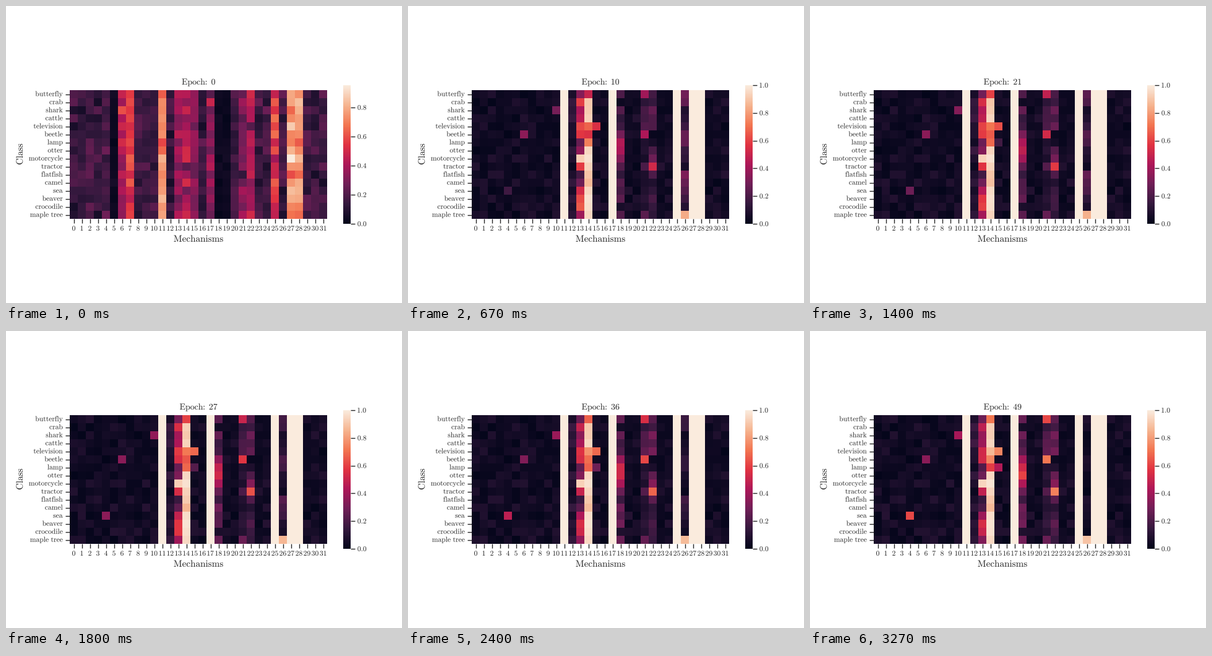
Recreate the animation shown at these times as a matplotlib script. Size 640 by 480 pixels, loop 3.34 s.

```python
import numpy as np
import matplotlib.pyplot as plt
from matplotlib.animation import FuncAnimation
from matplotlib.collections import LineCollection
from matplotlib.colors import LinearSegmentedColormap
from matplotlib.patches import PathPatch
from matplotlib.path import Path
from matplotlib.textpath import TextPath
from matplotlib.transforms import Affine2D

plt.rcParams["mathtext.fontset"] = "cm"

WIDTH, HEIGHT, DPI = 640, 480, 100
LOOP_MS, STEP_MS, EPOCHS = 3340, 20, 50
LEFT, TOP, CELL, ROWS, COLS = 103, 136, 13, 16, 32
RIGHT, BOTTOM = LEFT + COLS * CELL, TOP + ROWS * CELL
BAR_LEFT, BAR_RIGHT, BAR_TOP, BAR_BOTTOM = 545, 557, 128, 352
TICK, INK = 6.7, "#262626"
SMALL, MEDIUM, LARGE = 11.6, 13.85, 15.15

CLASSES = ["butterfly", "crab", "shark", "cattle", "television", "beetle",
           "lamp", "otter", "motorcycle", "tractor", "flatfish", "camel",
           "sea", "beaver", "crocodile", "maple tree"]

HEAT = LinearSegmentedColormap.from_list("heat", [
    "#03051a", "#35193e", "#701f57", "#ad1759",
    "#e13342", "#f37651", "#f6b48f", "#faebdd"])

# Mean activation of the mechanisms that stand out before training
WARM = {6: .35, 7: .52, 11: .74, 13: .38, 14: .4, 15: .33, 17: .33,
        21: .3, 22: .42, 25: .5, 27: .73, 28: .75}
COLD = [5, 18, 19]

# After training: always on, or selective with a mean drifting first -> last
SATURATED = [11, 17, 25, 27, 28]
SELECTIVE = {12: (.12, .12), 13: (.42, .33), 14: (.93, .94), 18: (.2, .27),
             21: (.13, .17), 22: (.15, .2), 26: (.22, .05)}
STRONG = {("motorcycle", 13): (.93, .94), ("butterfly", 14): (.5, .7),
          ("television", 14): (.65, .85), ("beetle", 14): (.6, .75),
          ("lamp", 14): (.75, .62), ("television", 15): (.55, .75),
          ("lamp", 15): (.05, .4), ("sea", 4): (.12, .6),
          ("shark", 10): (.3, .4), ("beetle", 6): (.38, .32),
          ("otter", 18): (.4, .6), ("lamp", 18): (.45, .52),
          ("butterfly", 21): (.4, .62), ("beetle", 21): (.42, .7),
          ("tractor", 22): (.5, .75), ("maple tree", 26): (.82, .9)}

rng = np.random.default_rng(12)
spread = np.clip(rng.gamma(2.5, 1 / 2.5, (ROWS, COLS)), .1, 2)


def vary(means, variation):
    """Spread the classes around each mean, less so near full activation."""
    return means * variation ** (1 - means)


def untrained_grid():
    means = np.full(COLS, .16)
    means[list(WARM)] = list(WARM.values())
    means[COLD] = .03
    grid = np.clip(vary(means, rng.normal(1, .35, (ROWS, COLS)).clip(.3)), 0, .9)
    grid[CLASSES.index("motorcycle"), 27] = .953
    return grid


def trained_grid(epoch):
    progress = np.clip((epoch - 6) / (EPOCHS - 7), 0, 1)
    means = np.full(COLS, .045)
    means[SATURATED] = 1
    for col, (first, last) in SELECTIVE.items():
        means[col] = first + (last - first) * progress
    grid = vary(means, spread)
    for (name, col), (first, last) in STRONG.items():
        grid[CLASSES.index(name), col] = first + (last - first) * progress
    jitter = np.random.default_rng(epoch).normal(0, .08, grid.shape)
    return grid * (1 + jitter * (1 - grid))


untrained = untrained_grid()


def activations(epoch):
    untaught = np.exp(-epoch / 1.3)
    blend = untaught * untrained + (1 - untaught) * trained_grid(epoch)
    return np.clip(blend, 0, 1)


def lettering(text, size, x, y, align=.5, angle=0):
    """Outline with its baseline at y; align 0, .5, 1 is left, centre, right."""
    body = text.replace(" ", r"\ ")
    path = TextPath((0, 0), rf"$\mathrm{{{body}}}$", size=size)
    box = path.get_extents()
    place = (Affine2D().translate(-box.x0 - align * box.width, 0)
             .rotate_deg(angle).scale(1, -1).translate(x, y))
    return path.transformed(place)


def title(epoch):
    number = str(epoch)
    half = 3.45 * len(number)
    x = 287.5 - half
    return [lettering("Epoch", MEDIUM, x + .4, 127, 0),
            lettering(":", MEDIUM, x + 38.7, 127, 0),
            lettering(number, MEDIUM, x + 47.5 + half, 127)]


def build(epoch):
    grid = activations(epoch)
    top = grid.max()
    values = np.arange(0, top + .005, .2)
    heights = BAR_BOTTOM - (BAR_BOTTOM - BAR_TOP) * np.minimum(values / top, 1)
    words = title(epoch) + [lettering(f"{v:.1f}", SMALL, 568.3, y + 3.8, 0)
                            for v, y in zip(values, heights)]
    marks = [[(BAR_RIGHT, y), (BAR_RIGHT + TICK, y)] for y in heights]
    return grid, Path.make_compound_path(*words), marks


states = [build(epoch) for epoch in range(EPOCHS)]

fig = plt.figure(figsize=(WIDTH / DPI, HEIGHT / DPI), dpi=DPI, facecolor="white")
ax = fig.add_axes([0, 0, 1, 1])
heatmap = ax.imshow(states[0][0], cmap=HEAT, aspect="auto",
                    interpolation="nearest", extent=(LEFT, RIGHT, BOTTOM, TOP))
ax.imshow(np.linspace(1, 0, 224)[:, None], cmap=HEAT, aspect="auto",
          interpolation="nearest",
          extent=(BAR_LEFT, BAR_RIGHT, BAR_BOTTOM, BAR_TOP))
ax.set(xlim=(0, WIDTH), ylim=(HEIGHT, 0))
ax.axis("off")

row_y = TOP + CELL * (np.arange(ROWS) + .5)
col_x = LEFT + CELL * (np.arange(COLS) + .5)
axis_marks = ([[(LEFT - TICK, y), (LEFT, y)] for y in row_y]
              + [[(x, BOTTOM), (x, BOTTOM + TICK)] for x in col_x])
ax.add_collection(LineCollection(axis_marks, colors=INK, linewidths=1),
                  autolim=False)
bar_marks = LineCollection([], colors=INK, linewidths=1)
ax.add_collection(bar_marks, autolim=False)

axis_words = [lettering(name, SMALL, 91.5, y + 3.2, 1)
              for name, y in zip(CLASSES, row_y)]
axis_words += [lettering(str(i), SMALL, x, 363) for i, x in enumerate(col_x)]
axis_words += [lettering("Mechanisms", LARGE, 311, 381),
               lettering("Class", LARGE, 27, 239.5, angle=90)]
ax.add_patch(PathPatch(Path.make_compound_path(*axis_words), fc=INK, lw=0))
live_words = ax.add_patch(PathPatch(states[0][1], fc=INK, lw=0))


def update(frame):
    # Each epoch is held until the next one replaces it
    epoch = int((frame * STEP_MS + 14) * EPOCHS / LOOP_MS)
    grid, words, marks = states[epoch]
    heatmap.set_data(grid)
    heatmap.set_clim(0, grid.max())
    live_words.set_path(words)
    bar_marks.set_segments(marks)
    return heatmap, live_words, bar_marks


anim = FuncAnimation(fig, update, frames=LOOP_MS // STEP_MS, interval=STEP_MS,
                     repeat=True, repeat_delay=0)
plt.show()
```
